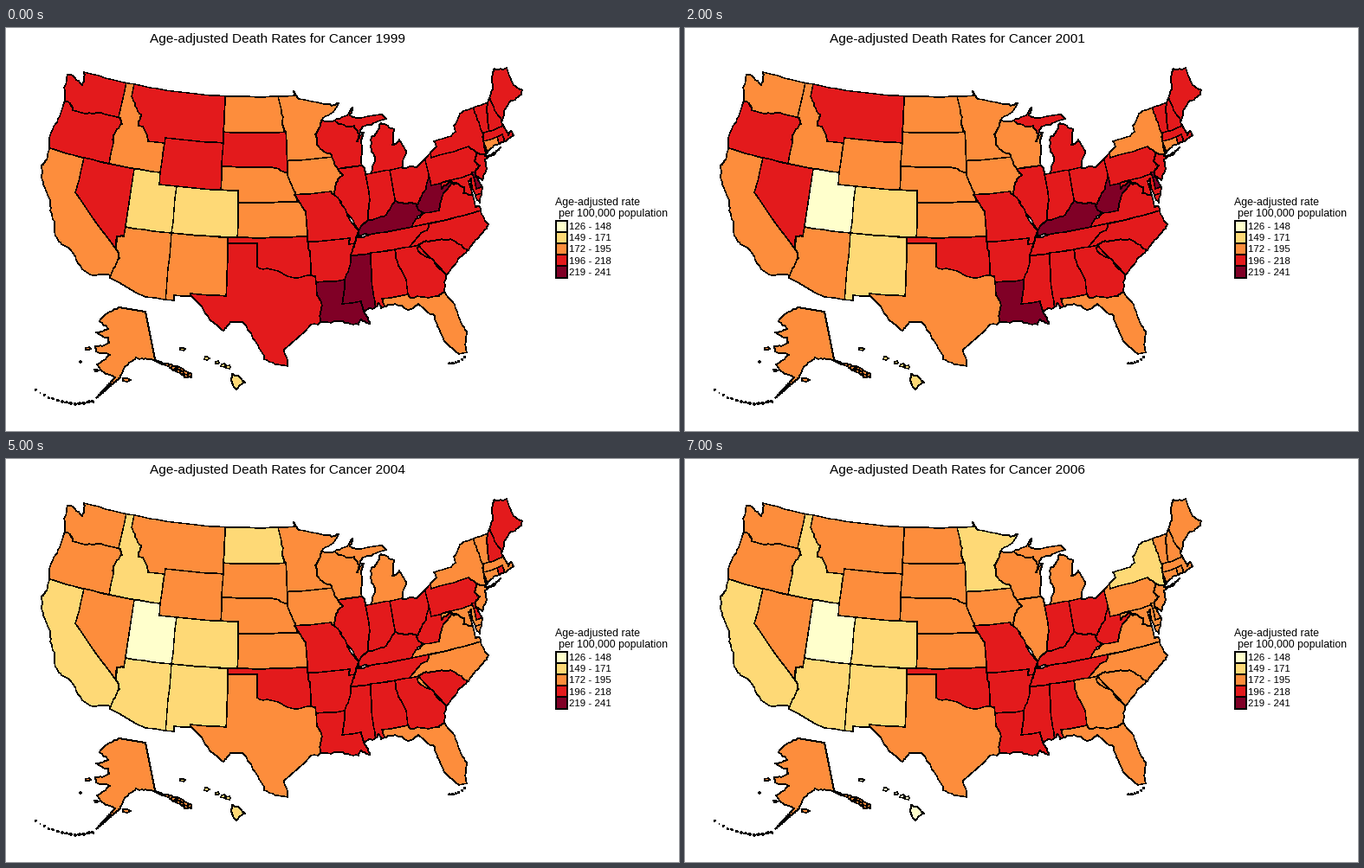
These frames come from a looping animation (777x466 px, 8000 ms). A matplotlib script:

```python
import math
import random

import matplotlib.pyplot as plt
from matplotlib.animation import FuncAnimation
from matplotlib.patches import Polygon, Rectangle

W, H, DPI = 777, 466, 100
PALETTE = ["#ffffcc", "#fed976", "#fd8d3c", "#e31a1c", "#800026"]
LABELS = ["126 - 148", "149 - 171", "172 - 195", "196 - 218", "219 - 241"]

# Class changes by year; a state not named in 1999 starts in class 4.
CHANGES = {
    1999: {2: "UT CO HI", 3: "CA ID AZ NM ND NE KS MN IA FL CT AK",
           5: "LA KY MS WV DE"},
    2000: {3: "MT WY SD WI NY", 4: "DE AK", 5: "TN"},
    2001: {1: "UT", 2: "NM", 3: "WA TX AK", 4: "MT TN MS", 5: "DE"},
    2002: {1: "HI", 3: "MT NC", 4: "DE"},
    2003: {2: "HI", 3: "OR MI RI MA VT NH", 4: "WV"},
    2004: {2: "CA ID AZ ND", 3: "NV VA MD NJ", 4: "LA KY RI NH"},
    2005: {2: "AK", 3: "ND NH RI GA SC"},
    2006: {1: "HI", 2: "MN NY", 3: "AK IL PA DE ME"},
}
YEARS = list(CHANGES)

# Aliased strokes on whole pixels come out one pixel wide.
PEN = dict(edgecolor="black", linewidth=0.3, antialiased=False, snap=True)
rng = random.Random(7)
shapes = []

plt.rcParams["font.family"] = "Liberation Sans"
fig = plt.figure(figsize=(W / DPI, H / DPI), dpi=DPI, facecolor="white")
ax = fig.add_axes([0, 0, 1, 1])
ax.set_xlim(0, W)
ax.set_ylim(H, 0)
ax.axis("off")


def project(lon, lat):
    """Lambert azimuthal equal-area around 45N 100W, in pixels."""
    a, b, c = math.radians(lat), math.radians(100 - lon), math.radians(45)
    u = math.cos(a) * math.cos(b)
    k = 778.7 * math.sqrt(2 / (1 + math.sin(c) * math.sin(a) + math.cos(c) * u))
    x = k * math.cos(a) * math.sin(b)
    y = k * (math.cos(c) * math.sin(a) - math.sin(c) * u)
    return 289.5 + x, 133.9 - y


def rough(p, q, depth):
    """Points from p up to q, with each midpoint shifted sideways."""
    if depth == 0:
        return [p]
    dx, dy = q[0] - p[0], q[1] - p[1]
    s = rng.uniform(-0.1, 0.1)
    mid = ((p[0] + q[0]) / 2 - dy * s, (p[1] + q[1]) / 2 + dx * s)
    return rough(p, mid, depth - 1) + rough(mid, q, depth - 1)


def trace(v, limit):
    """Closed outline: short slanted edges turn rough, the others stay straight."""
    pts = list(zip(v[::2], v[1::2]))
    out = []
    for p, q in zip(pts, pts[1:] + pts[:1]):
        dx, dy = q[0] - p[0], q[1] - p[1]
        size = math.hypot(dx, dy)
        if size < limit and min(abs(dx), abs(dy)) > 0.06:
            out += rough(p, q, 3 if size > limit / 5 else 2)
        else:
            n = math.ceil(size)
            out += [(p[0] + dx * i / n, p[1] + dy * i / n) for i in range(n)]
    return out


def shape(name, pts):
    patch = ax.add_patch(Polygon(pts, **PEN))
    shapes.append((name, patch))
    return patch


def state(name, *v):
    """Cell in degrees west and north, cut off at the coast; later cells cover it."""
    pts = [project(*p) for p in trace(v, 3)]
    shape(name, pts).set_clip_path(land)


def box(name, west, east, south, north):
    state(name, west, north, east, north, east, south, west, south)


def islet(name, x, y, r):
    turns = [i * math.tau / 5 for i in range(5)]
    shape(name, [(x + r * rng.uniform(0.6, 1.5) * math.cos(t),
                  y + r * rng.uniform(0.4, 1) * math.sin(t)) for t in turns])


# Key points of the country's outline, counter-clockwise from the north-west
pacific = [122.76, 49, 122.4, 48.3, 122.5, 47.9, 123, 48.13, 124.7, 48.38, 124.05, 46.27,
           124.05, 44.8, 124.5, 42.8, 124.1, 41, 124.4, 40.4, 123.7, 38.9, 122.5, 37.8,
           121.9, 36.6, 120.63, 34.6, 119.2, 34.1, 117.12, 32.53]
south = [114.75, 32.7, 114.81, 32.5, 111.07, 31.33, 108.21, 31.33, 108.21, 31.78,
         106.5, 31.78, 104.6, 29.9, 103.2, 28.98, 102.6, 29.75, 101.4, 29.77,
         100.4, 28.4, 99.3, 26.6, 97.15, 25.95]
gulf = [97.4, 27.4, 94.75, 29.4, 92.2, 29.55, 90.2, 29.1, 89.9, 29.5, 89.1, 29,
        89.5, 30.1, 88.4, 30.35, 88, 30.7, 87.8, 30.25, 86.4, 30.4, 85.3, 29.7,
        84.2, 30.05, 82.75, 28.8, 82.6, 27.6, 81.15, 25.2, 80.4, 25.2, 80.05, 26.9,
        80.55, 28.45, 81.4, 30.7]
atlantic = [80.87, 32.03, 79.2, 33.2, 77.95, 33.87, 76.55, 34.65, 75.55, 35.25, 75.98, 36.9,
            76.4, 37, 76.4, 39.2, 76.05, 39.4, 76.2, 38.4, 75.9, 37.2, 75.1, 38.4,
            75.5, 39.5, 74.9, 38.95, 74.1, 39.75, 74, 40.55, 71.9, 41.07, 73.8, 40.85,
            72.9, 41.25, 71.4, 41.45, 69.95, 41.65, 70.1, 42.05, 70.5, 41.8, 70.7, 42.65,
            70.75, 43.05, 70, 43.8, 68.8, 44.4, 67, 44.85]
north = [67.8, 45.7, 67.8, 47.07, 69.23, 47.46, 70, 46.7, 70.3, 45.9, 71.1, 45.3,
         71.5, 45, 74.7, 45, 76.3, 44.1, 76.3, 43.5, 79.05, 43.25, 78.9, 42.8,
         81.7, 41.5, 83.3, 41.7, 82.45, 43, 82.95, 44.07, 83.9, 43.75, 83.3, 45.05,
         84.75, 45.78, 85.5, 45, 86.25, 44.7, 86.5, 43.6, 86.2, 42.8, 86.9, 41.7]
lakes = [87.5, 41.7, 87.8, 42.5, 87.5, 44.4, 87.05, 45.25, 88, 44.55, 87.6, 45.1,
         87, 45.75, 84.8, 45.95, 84, 46, 84.6, 46.5, 87, 46.5, 88.4, 46.85, 87.9, 47.45,
         90.4, 46.6, 92, 46.7, 89.6, 48, 91.4, 48.1, 94.6, 48.7, 95.15, 49.35, 95.15, 49]
coast = trace(pacific + south + gulf + atlantic + north + lakes, 3)
land = ax.add_patch(Polygon([project(*p) for p in coast], fill=False, zorder=3, **PEN))

# West
box("MT", 116.5, 104.05, 44.2, 50)
state("ID", 118, 50, 116.05, 50, 116.05, 48, 114.4, 46.6, 114.5, 45.6, 113.9, 45.6,
      113, 44.45, 111.05, 44.5, 111.05, 42, 118, 42)
box("WA", 126, 117.03, 45, 50)
state("OR", 126, 46.3, 123.3, 46.15, 122.75, 45.65, 121.2, 45.65, 119, 46, 116.92, 46,
      116.5, 45.5, 117.2, 44.4, 117.03, 43.8, 117.03, 42, 126, 42)
box("CA", 126, 113.5, 32, 42)
state("NV", 120, 42, 114.05, 42, 114.05, 36.2, 114.74, 36.05, 114.63, 35, 120, 39)
box("UT", 114.05, 109.05, 37, 42)
box("WY", 111.05, 104.05, 41, 45)
state("AZ", 114.05, 37, 109.05, 37, 109.05, 31, 114.8, 31, 114.72, 32.7, 114.14, 34.3,
      114.63, 35, 114.74, 36.05, 114.05, 36.2)
box("CO", 109.05, 102.05, 37, 41)
box("TX", 107, 93, 25, 36.5)
state("NM", 109.05, 37, 103.04, 37, 103.04, 32, 106.62, 32, 106.53, 31, 109.05, 31)

# Plains and lakes
box("MN", 98, 89, 43.5, 50)
box("IA", 96.9, 90, 40.4, 43.5)
state("ND", 104.05, 50, 97.23, 50, 97.23, 49, 96.8, 46.6, 96.56, 45.94, 104.05, 45.94)
box("SD", 104.05, 96.45, 42.4, 45.94)
state("NE", 104.05, 43, 98.5, 43, 96.45, 42.5, 95.85, 41, 95.3, 40, 102.05, 40,
      102.05, 41, 104.05, 41)
box("KS", 102.05, 94.62, 37, 40)
state("OK", 103.04, 37, 94.62, 37, 94.43, 35.4, 94.48, 33.64, 97.2, 33.8, 100, 34.56,
      100, 36.5, 103.04, 36.5)
box("OH", 84.81, 80.52, 38, 43)
box("IN", 88, 84.81, 37.5, 41.74)
box("MI", 87.2, 82, 41.74, 45.85)
state("IL", 90.64, 42.5, 87.53, 42.5, 87.53, 39.4, 88.1, 37.8, 89.15, 37, 90.2, 38.7,
      91.42, 40.38, 91.05, 41.3, 90.15, 41.9)
state("WI", 92, 46.7, 92.29, 46.1, 92.85, 45.6, 92.75, 44.7, 91.2, 43.7, 90.64, 42.5,
      87.1, 42.5, 87, 45.3, 90, 47.5)
state("MI", 90.42, 46.57, 88.1, 45.9, 87.6, 45.1, 87, 45.4, 83, 45.85, 83, 47.5, 88, 48)

# South-east
box("NC", 84.32, 75, 33, 36.57)
box("MD", 79.48, 75, 37.9, 39.72)
box("FL", 88, 79, 24, 31)
box("MS", 91.7, 88, 29.8, 35)
state("KY", 89.15, 37, 88.1, 37.8, 86, 38, 84.82, 39.1, 83.75, 38.65, 82.6, 38.5,
      81.97, 37.54, 83.68, 36.6, 88.07, 36.6, 89.4, 36.5)
state("VA", 83.68, 36.6, 75, 36.55, 75, 37.95, 76.3, 37.95, 77.25, 38.4, 77.04, 38.85,
      77.72, 39.32, 78.35, 39.4, 81.97, 37.54)
state("TN", 89.4, 36.5, 88.07, 36.6, 81.68, 36.59, 82, 36.1, 84.32, 34.99, 90.3, 35,
      89.7, 36)
state("WV", 80.52, 40.64, 80.52, 39.72, 79.48, 39.72, 79.48, 39.2, 78.4, 39.6, 77.72, 39.32,
      78.35, 39.4, 79.7, 38.5, 80.3, 37.5, 81.97, 37.54, 82.6, 38.3, 81.8, 39)
state("SC", 83.2, 35, 82.3, 35.2, 81.05, 35.1, 79.67, 34.8, 78.4, 33.7, 79, 31.5,
      80.87, 32)
state("AL", 88.2, 35, 85.6, 35, 84.9, 32, 85, 31, 87.6, 31, 87.5, 29.8, 88.4, 29.8,
      88.47, 32)
state("GA", 85.6, 35, 83.1, 35, 83.35, 34.7, 81.9, 33.4, 80.87, 32, 80, 31, 81.4, 30.7,
      82.05, 30.4, 84.86, 30.7, 85, 31, 84.95, 32.3)
state("MO", 95.77, 40.58, 91.73, 40.6, 91.42, 40.38, 90.2, 38.7, 89.15, 37, 89.7, 36,
      90.35, 36, 90.15, 36.5, 94.62, 36.5, 94.62, 39.1, 95.3, 40)
state("AR", 94.62, 36.5, 90.15, 36.5, 90.35, 36, 89.7, 36, 90.3, 35, 91.15, 33,
      94.04, 33, 94.04, 33.55, 94.48, 33.64, 94.43, 35.4)
state("LA", 94.04, 33, 91.15, 33, 91.6, 31, 89.7, 31, 89.5, 30, 88, 28, 93.85, 28,
      93.85, 29.7, 93.6, 31.2, 94.04, 32)

# North-east
box("PA", 80.52, 74.5, 39.72, 42.5)
box("DE", 75.79, 75, 38.45, 39.83)
box("ME", 71.1, 66, 43, 48)
box("MA", 73.6, 69.5, 41.2, 42.73)
box("VT", 73.4, 71.5, 42.73, 45.1)
state("NH", 72.46, 42.73, 70.5, 42.8, 70.72, 43.08, 71.1, 45.4, 71.5, 45, 72.05, 44.1)
box("CT", 73.5, 71.86, 40.95, 42.03)
box("RI", 71.86, 71.2, 41.2, 42.03)
state("NY", 79.76, 42, 75.35, 42, 74.7, 41.36, 74, 40.4, 71, 40.4, 71, 41.2, 73.65, 41,
      73.5, 42.05, 73.27, 42.75, 73.35, 45.2, 79.76, 45.2)
state("NJ", 75.4, 39.8, 74.75, 40.2, 75.15, 40.7, 74.7, 41.36, 73.9, 41, 73.5, 40,
      74.5, 38.5, 75.55, 39.4)

# Insets, in pixels
alaska = [108, 339, 120, 328, 130, 323, 161, 328, 172, 383, 183, 388, 198, 391, 214, 400,
          214, 404, 203, 401, 184, 390, 168, 383, 150, 381, 138, 391, 132, 404, 104, 428,
          126, 404, 114, 399, 105, 389, 120, 378, 104, 374, 103, 368, 119, 364, 118, 358,
          104, 352, 118, 348]
shape("AK", trace(alaska, 30))
for x, y, r in ((139, 407, 4), (95, 371, 3), (104, 396, 2), (86, 386, 1)):
    islet("AK", x, y, r)
for i in range(8):
    islet("AK", 191 + 3 * i, 390 + 1.8 * i + rng.uniform(-2, 2), 2.5)
for i in range(14):
    u = i / 13
    islet("AK", 34 + 66 * u, 419 + 45 * u - 33 * u * u + rng.uniform(-1, 1), 0.5 + u)
for x in (204, 231, 244, 251, 257):
    islet("HI", x, 371 + 0.4 * (x - 204), 2.8)
shape("HI", trace([261, 400, 268, 402, 276, 410, 266, 418, 260, 408], 30))
for i in range(6):
    islet("FL", 512 + 3.6 * i, 388 - 0.3 * i * i, 0.8)


def label(x, y, text, px, ha="left"):
    return ax.text(x, y, text, fontsize=px * 72 / DPI, ha=ha, va="baseline")


title = label(314, 17, "", 15.45, "center")
label(634, 205, "Age-adjusted rate", 12.4)
label(637.5, 218, "per 100,000 population", 12.3)
for i, (color, text) in enumerate(zip(PALETTE, LABELS)):
    top = 222.5 + 13.2 * i
    ax.add_patch(Rectangle((634.5, top), 13, 13.2, facecolor=color, **PEN))
    label(650, top + 10.5, text, 11.5)


def draw(frame):
    level = {name: 4 for name, _ in shapes}
    for year in YEARS[:frame + 1]:
        for value, names in CHANGES[year].items():
            level.update(dict.fromkeys(names.split(), value))
    for name, patch in shapes:
        patch.set_facecolor(PALETTE[level[name] - 1])
    title.set_text(f"Age-adjusted Death Rates for Cancer {YEARS[frame]}")
    return [title] + [patch for _, patch in shapes]


anim = FuncAnimation(fig, draw, frames=len(YEARS), interval=1000, repeat=True,
                     repeat_delay=0)
plt.show()
```
